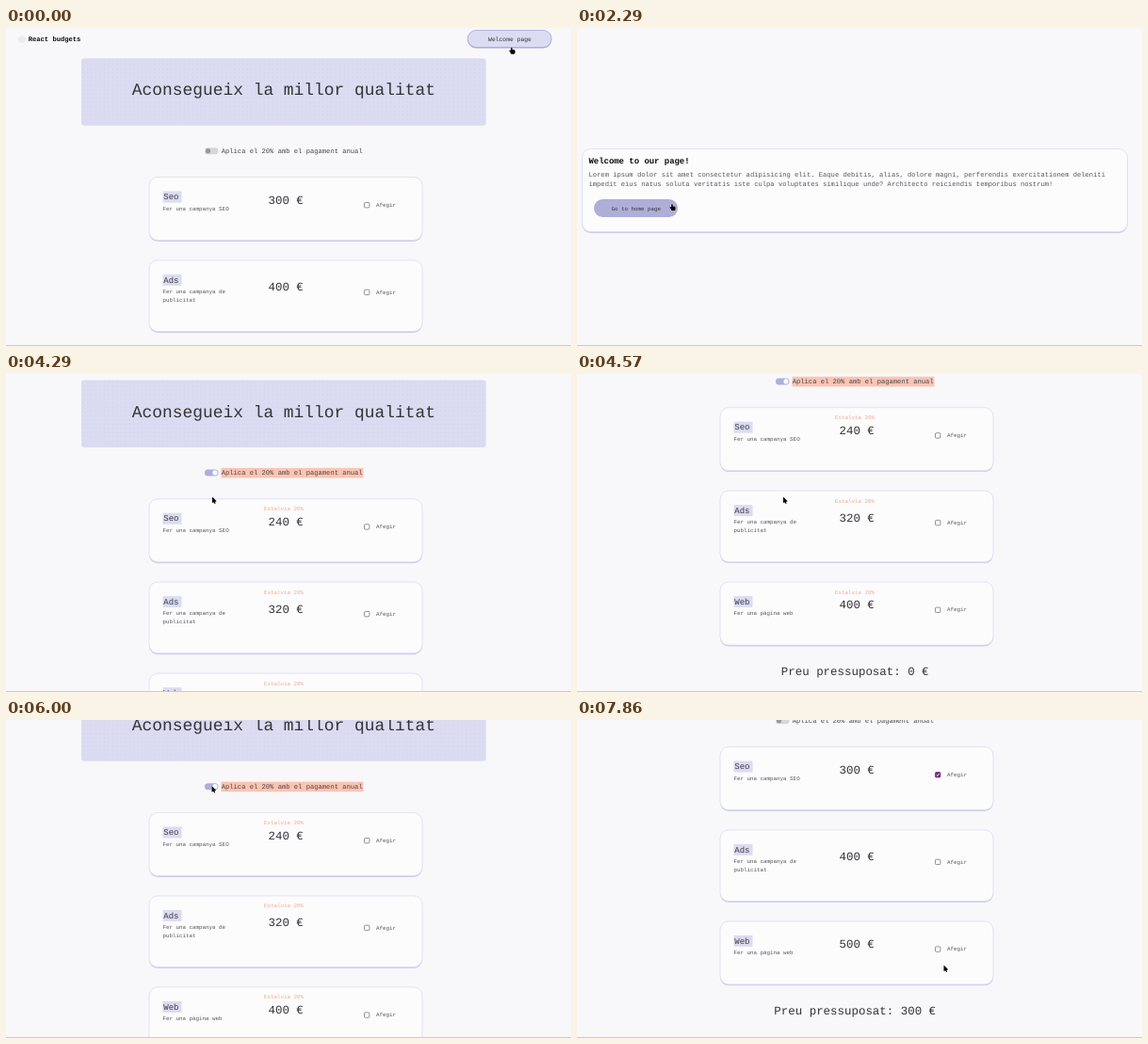
Animation of 600x338 px, one loop 8 s. Source, as an HTML page with a canvas:

```html
<!DOCTYPE html>
<html lang="ca">
<head>
<meta charset="utf-8">
<title>React budgets</title>
<style>
  html, body { margin: 0; width: 100%; height: 100%; overflow: hidden; background: #f8f7fa; }
  canvas { display: block; width: 600px; height: 338px; }
</style>
</head>
<body>
<canvas id="stage"></canvas>
<script>
const W = 600, H = 338, LOOP = 8000, STEPS = 56;
const PAGE = '#f8f7fa', LAVENDER = '#dbdcf1', EDGE = '#a6a8d3', VIOLET = '#afaed9';
const INK = '#333338', SOFT = '#56565b', BLACK = '#0c0c0e';
const MONO = '"Liberation Mono", "Courier New", monospace';
const BODY = 7.15, SMALL = 5.85, LARGE = 12.45, LEAD = 8.6;

const canvas = document.getElementById('stage');
const ctx = canvas.getContext('2d');
const dpr = Math.max(1, window.devicePixelRatio || 1);
canvas.width = W * dpr;
canvas.height = H * dpr;

// Moves are [start step, end step, ...destination].
const pointerMoves = [
  [6, 8, 468, 34],
  [9, 16, 101, 187],
  [20, 23, 153.5, 166],
  [24, 27, 219, 130.5],
  [40, 42, 218.5, 70],
  [48, 51, 382.5, 57],
  [52, 55, 389.5, 260.5]
];
const scrollMoves = [[29, 32.5, 130], [33.5, 41.8, 60], [44, 48, 130]];

function follow(origin, moves, k) {
  let at = origin;
  for (const [start, end, ...goal] of moves) {
    const p = Math.min(1, Math.max(0, (k - start) / (end - start)));
    const eased = p * p * (3 - 2 * p);
    at = at.map((v, i) => v + (goal[i] - v) * eased);
  }
  return at;
}

function text(str, x, y, size, color = INK, weight = 'normal', align = 'left') {
  ctx.font = `${weight} ${size}px ${MONO}`;
  ctx.textAlign = align;
  ctx.fillStyle = color;
  ctx.fillText(str, x, y);
}

function rect(x, y, w, h, fill) {
  ctx.fillStyle = fill;
  ctx.fillRect(x, y, w, h);
}

function round(x, y, w, h, r, fill, stroke) {
  ctx.beginPath();
  ctx.roundRect(x, y, w, h, r);
  ctx.fillStyle = fill;
  ctx.fill();
  if (!stroke) return;
  ctx.strokeStyle = stroke;
  ctx.lineWidth = 0.8;
  ctx.stroke();
}

function circle(x, y, r, fill) {
  round(x - r, y - r, 2 * r, 2 * r, r, fill);
}

function panel(x, y, w, h) {
  round(x, y + 1.4, w, h, 9, '#ceceea');
  round(x, y, w, h, 9, '#fcfcfd', LAVENDER);
}

function pill(x, y, label, size, hover) {
  if (!hover) round(x, y + 0.8, 89, 18.4, 9.2, EDGE);
  round(x, y, 89, hover ? 19 : 18.2, 9.2, hover ? VIOLET : LAVENDER, hover ? null : EDGE);
  text(label, x + 44.7, y + 11.7, size, INK, 'normal', 'center');
}

function banner(x, y, w, h) {
  const gap = 4.47;
  round(x, y, w, h, 3, LAVENDER);
  for (let dy = 2; dy < h; dy += gap)
    for (let dx = 2; dx < w; dx += gap) circle(x + dx, y + dy, 0.45, '#c6c8e4');
  text('Aconsegueix la millor qualitat', x + w / 2, y + 39, 17.9, INK, 'normal', 'center');
}

function toggle(on) {
  round(211, 127.2, 14.5, 7, 3.5, on ? VIOLET : '#d6d6d9');
  circle(on ? 222 : 214.5, 130.7, 2.6, on ? '#fafaff' : '#98989c');
}

function checkbox(x, y, on) {
  round(x, y, 5.4, 5.4, 1, on ? '#75287f' : '#fff', on ? '#75287f' : '#77777b');
  if (!on) return;
  ctx.beginPath();
  ctx.moveTo(x + 1.2, y + 2.8);
  ctx.lineTo(x + 2.3, y + 3.9);
  ctx.lineTo(x + 4.3, y + 1.4);
  ctx.strokeStyle = '#fff';
  ctx.lineWidth = 0.9;
  ctx.stroke();
}

const offers = [
  { name: 'Seo', desc: ['Fer una campanya SEO'], cost: 300 },
  { name: 'Ads', desc: ['Fer una campanya de', 'publicitat'], cost: 400 },
  { name: 'Web', desc: ['Fer una pàgina web'], cost: 500 }
];

// Draws one offer and returns the card's height.
function drawOffer({ name, desc, cost }, y, yearly, picked) {
  const h = 67 + (desc.length - 1) * LEAD, mid = y + h / 2;
  panel(152, y, 290, h);
  rect(166.5, y + 15, 20, 12, LAVENDER);
  text(name, 167.3, y + 23.7, 9, '#3c3c44');
  desc.forEach((line, i) => text(line, 166.5, y + 35 + i * LEAD, SMALL, SOFT));
  if (yearly) text('Estalvia 20%', 274, y + 12.5, SMALL, '#f3a68f');
  text(`${cost * (yearly ? 0.8 : 1)} €`, 278.5, mid - 5.4, LARGE);
  checkbox(380.5, mid - 6.5, picked);
  text('Afegir', 393, mid - 2.2, SMALL, SOFT);
  return h;
}

function drawHome({ scroll, navHover, yearly, marked, picked }) {
  ctx.save();
  ctx.translate(0, -scroll);
  circle(17, 12, 3.8, '#ebeaef');
  text('React budgets', 23.7, 14.2, BODY, BLACK, 'bold');
  pill(490.3, 2.4, 'Welcome page', 6.36, navHover);
  banner(80, 32.3, 429.7, 71.5);

  if (marked) rect(228.5, 125.6, 151, 10.6, '#fbc4b2');
  toggle(yearly);
  text('Aplica el 20% amb el pagament anual', 228.7, 133, BODY, '#45454a');

  let y = 158.5;
  offers.forEach((offer, i) => {
    y += drawOffer(offer, y, yearly, picked && i === 0) + 21.4;
  });
  const total = picked ? offers[0].cost : 0;
  text(`Preu pressuposat: ${total} €`, 295.2, y + 10.7, LARGE, INK, 'normal', 'center');
  ctx.restore();
}

function drawWelcome(hover) {
  panel(5.5, 128.5, 579, 88);
  text('Welcome to our page!', 12.5, 143.8, 8.94, BLACK, 'bold');
  text('Lorem ipsum dolor sit amet consectetur adipisicing elit. Eaque debitis, alias, dolore magni, perferendis exercitationem deleniti', 12.5, 157.6, BODY, SOFT);
  text('impedit eius natus soluta veritatis iste culpa voluptates similique unde? Architecto reiciendis temporibus nostrum!', 12.5, 168.4, BODY, SOFT);
  pill(18, 182, 'Go to home page', SMALL, hover);
}

function pointerPath(hand) {
  const p = new Path2D();
  if (hand) {
    p.roundRect(-0.8, 0, 1.5, 5, 0.7);
    p.roundRect(-1.4, 2.6, 5, 4.6, 1.4);
    p.ellipse(-1.5, 4.2, 1.3, 0.8, 0.7, 0, Math.PI * 2);
  } else {
    p.lineTo(0, 0);
    p.lineTo(0, 6.6);
    p.lineTo(4.7, 4.7);
    p.closePath();
    p.moveTo(1.3, 4.8);
    p.lineTo(2.5, 7.6);
    p.lineTo(3.6, 7.2);
    p.lineTo(2.6, 4.6);
    p.closePath();
  }
  return p;
}

function drawPointer(x, y, hand) {
  const path = pointerPath(hand);
  ctx.save();
  ctx.translate(x, y);
  ctx.lineJoin = 'round';
  ctx.strokeStyle = '#fff';
  ctx.lineWidth = 0.8;
  ctx.stroke(path);
  ctx.fillStyle = '#000';
  ctx.fill(path);
  ctx.restore();
}

function draw(k) {
  const [x, y] = follow([537, 20.5], pointerMoves, k);
  const onWelcome = k >= 2 && k < 18;
  const overHome = k >= 15 && k < 19;
  ctx.setTransform(dpr, 0, 0, dpr, 0, 0);
  ctx.textRendering = 'geometricPrecision';
  rect(0, 0, W, H, PAGE);
  if (onWelcome) drawWelcome(overHome);
  else drawHome({
    scroll: follow([0], scrollMoves, k)[0],
    navHover: k === 1,
    yearly: k >= 28 && k < 44,
    marked: k >= 29 && k < 44,
    picked: k >= 52
  });
  rect(0, 337, W, 1, '#cbcbcf');
  drawPointer(x, y, k < 3 || overHome);
}

function tick(now) {
  // the small lead absorbs rounding at step boundaries
  draw(Math.floor((now % LOOP + 3) * STEPS / LOOP) % STEPS);
  requestAnimationFrame(tick);
}
draw(0);
requestAnimationFrame(tick);
</script>
</body>
</html>
```
